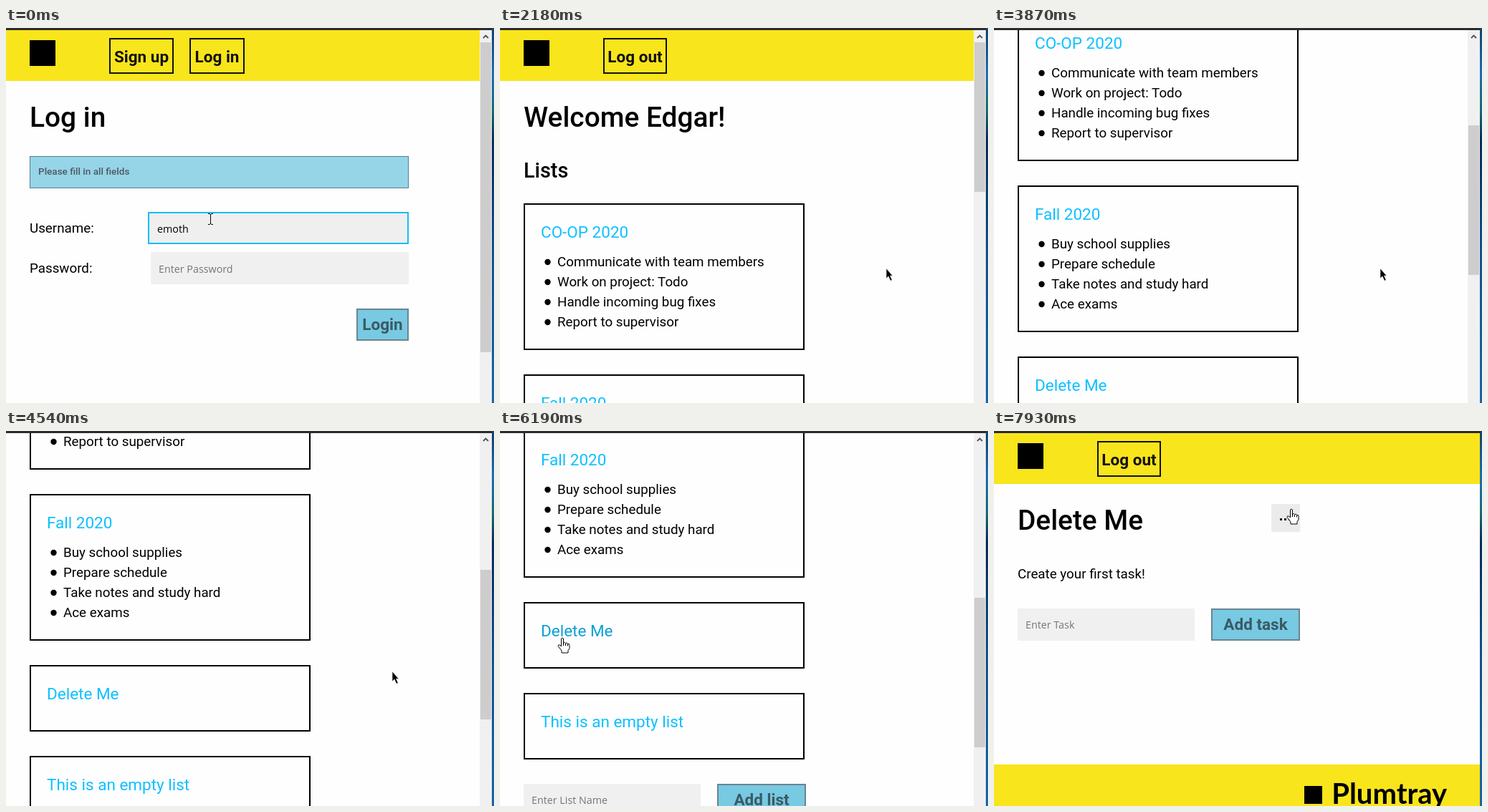
An HTML page that plays this animation: 681x524 px, repeating every 8000 ms.

```html
<!DOCTYPE html>
<html lang="en">
<head>
<meta charset="utf-8">
<title>Todo lists</title>
<style>
html, body { margin: 0; width: 100%; height: 100%; overflow: hidden; background: #fefefe; }
svg { display: block; width: 681px; height: 524px; }
text { font: 400 18.8px Roboto, sans-serif; white-space: pre; }
.h1 { font-size: 38.8px; font-weight: 500; }
.h2 { font-size: 28.8px; font-weight: 500; }
.link { font-size: 22.5px; fill: #0dc0ff; }
.link.over { fill: #0a9fd4; }
.note { font-size: 13.5px; font-weight: 500; fill: #4c5a60; }
.btn { font: 600 22.5px Roboto, sans-serif; font-stretch: 75%; text-anchor: middle; fill: #111; }
.in { font: 400 14.3px "Open Sans", "Noto Sans", sans-serif; }
.hint { fill: #757575; }
.brand { font: 700 40px Lato, sans-serif; text-anchor: end; }
</style>
</head>
<body>
<svg id="stage" viewBox="0 0 681 524"></svg>
<script>
const LOOP = 8000, YELLOW = '#f9e51b', CYAN = '#1cc8ff';

// [ms, x, y, shape]
const pointer = [
  [0, 285, 267, 'beam'], [300, 285, 270, 'beam'], [420, 285, 274, 'beam'],
  [570, 300, 305, 'beam'], [690, 314, 332, 'beam'], [810, 316, 334, 'beam'],
  [1080, 316, 326, 'arrow'], [1230, 430, 399, 'arrow'], [1360, 536, 381, 'arrow'],
  [1510, 540, 347, 'hand'], [1630, 539, 336, 'hand'], [2180, 539, 336, 'arrow'],
  [5790, 405, 318, 'arrow'], [5910, 205, 301, 'arrow'], [6040, 76, 296, 'arrow'],
  [6190, 87, 289, 'hand'], [6840, 87, 289, 'beam'], [7270, 97, 287, 'beam'],
  [7420, 190, 262, 'beam'], [7540, 330, 205, 'arrow'], [7660, 419, 160, 'arrow'],
  [7810, 416, 136, 'hand'], [7930, 415, 109, 'hand']
];

// [ms, scroll offset]
const scroll = [
  [2180, 0], [3050, 44], [3200, 88], [3320, 132], [3470, 220], [3870, 264], [4020, 297],
  [4140, 308], [4540, 396], [4690, 528], [4810, 572], [5400, 528], [5520, 484]
];

const lists = [
  [245, 'CO-OP 2020', ['Communicate with team members', 'Work on project: Todo',
    'Handle incoming bug fixes', 'Report to supervisor']],
  [484, 'Fall 2020', ['Buy school supplies', 'Prepare schedule',
    'Take notes and study hard', 'Ace exams']],
  [723, 'Delete Me', []],
  [850, 'This is an empty list', []]
];

const at = (steps, t) => steps.filter(s => s[0] <= t).pop();

const rect = (x, y, w, h, fill, more = '') =>
  `<rect x="${x}" y="${y}" width="${w}" height="${h}" fill="${fill}" ${more}/>`;
const frame = (x, y, w, h, fill, stroke, line = 2) =>
  rect(x + line / 2, y + line / 2, w - line, h - line, fill, `stroke="${stroke}" stroke-width="${line}"`);
const text = (x, y, str, cls = '') => `<text x="${x}" y="${y}" class="${cls}">${str}</text>`;

const navButton = (x, w, label) =>
  frame(x, 14, w, 50, 'none', '#111') + text(x + w / 2, 47.5, label, 'btn');

function header(width, loggedIn) {
  return rect(0, 0, width, 74, YELLOW) + rect(33, 17, 36, 36, '#000') +
    (loggedIn ? navButton(144, 89, 'Log out')
              : navButton(144, 90, 'Sign up') + navButton(256, 77, 'Log in'));
}

function footer(width, y) {
  return rect(0, y, width, 90, YELLOW) + rect(width - 245, y + 30, 25, 25, '#000') +
    text(width - 46, y + 55, 'Plumtray', 'brand');
}

function button(x, y, w, label, fill) {
  return fill
    ? frame(x, y, w, 45, fill, '#111') + text(x + w / 2, y + 30, label, 'btn')
    : frame(x, y, w, 45, '#78c9e2', '#6b8490') +
      `<g fill-opacity=".6">${text(x + w / 2, y + 30, label, 'btn')}</g>`;
}

// Input of the login form; a focused one grows to the left
function field(y, focused, content) {
  return (focused ? frame(198, y, 364, 45, '#efefef', '#16bdf3') : rect(202, y, 360, 45, '#f0f0f0')) +
    content(focused ? 211 : 213);
}

function adder(y, thing) {
  return rect(33, y, 247, 45, '#f0f0f0') + text(44, y + 28, 'Enter ' + thing[0], 'in hint') +
    button(303, y, 124, thing[1]);
}

function scrollbar(top, height) {
  return rect(661, 0, 17, 524, '#f0f0f0') + rect(662, top, 15, height, '#cdcdcd') +
    '<path d="M666 14l3.5-3.5 3.5 3.5" fill="none" stroke="#505050" stroke-width="1.8"/>';
}

function loginPage(t) {
  const filled = t >= 1080, sent = t >= 1780, y = filled ? 179 : 257;
  const onPass = t >= 690 && !sent;
  const dots = x => [...Array(7).keys()]
    .map(i => `<circle cx="${x + 4 + i * 9.35}" cy="${y + 81}" r="3.7"/>`).join('');
  const caret = (x, top) => rect(x, top, 1, 18, '#000');
  const note = frame(33, 179, 529, 45, '#96d4e8', '#527f90', 1) +
    text(45, 205, 'Please fill in all fields', 'note');
  return header(661) + text(33, 138, 'Log in', 'h1') + (filled ? '' : note) +
    text(33, y + 29, 'Username:') + text(33, y + 85, 'Password:') +
    field(y, t < 690, x => text(x, y + 29, 'emoth', 'in')) +
    field(y + 56, onPass, x => filled
      ? dots(x) + (t < 1230 ? caret(276, y + 70) : '')
      : text(x, y + 85, 'Enter Password', 'in hint') + (onPass ? caret(x, y + 70) : '')) +
    button(489, y + 135, 73, 'Login', filled && (t >= 1510 && !sent ? '#19b6e8' : CYAN)) +
    footer(661, y + 292 + (sent ? 28 : 0)) + scrollbar(20, filled ? 520 : 433);
}

function listCard([y, title, items], over) {
  return frame(33, y, 392, items.length ? 205 : 93, '#fefefe', '#000') +
    text(57, y + 48, title, over ? 'link over' : 'link') +
    items.map((item, i) => `<circle cx="66.5" cy="${y + 82 + i * 28}" r="4.2"/>` +
      text(80, y + 88 + i * 28, item)).join('');
}

function homePage(t) {
  const s = at(scroll, t)[1];
  return `<g transform="translate(0 ${-s})">` + header(661, true) +
    text(33, 138, 'Welcome Edgar!', 'h1') + text(33, 209, 'Lists', 'h2') +
    lists.map((list, i) => listCard(list, i === 2 && t >= 6190)).join('') +
    adder(977, ['List Name', 'Add list']) + footer(661, 1135) + '</g>' +
    scrollbar(Math.round(19.6 + s * 0.441), 209);
}

function listPage(t) {
  return header(678, true) + footer(678, 466) + (t < 6960
    ? text(33, 128, 'Loading list...')
    : text(33, 138, 'Delete Me', 'h1') + rect(387, 102, 40, 39, '#ebebeb', 'rx="2"') +
      [399, 405, 411].map(x => rect(x, 122, 3, 3, '#111')).join('') +
      text(33, 206, 'Create your first task!') + adder(248, ['Task', 'Add task']));
}

const shapes = {
  arrow: '<path d="M0 0V14l3-3 2.8 6.2 2.4-1-2.7-6H9z" stroke="#fff" stroke-width=".6"/>',
  beam: '<path d="M-3-7.5H-1L.5-6.5 2-7.5H4M.5-6.5V6.5M-3 7.5H-1L.5 6.5 2 7.5H4" fill="none" stroke="#000"/>',
  hand: '<path d="M-1.5 1Q0-1 1.5 1V7l2-.5 1 1 2-.3 1 1.2 2 .3.5 2v4l-2 3v3.3H-1V18l-5-6.5q0-2.5 2.5-1.5l2 2z" fill="#fff" stroke="#000"/>' +
    '<path d="M1.5 7v4M4.5 8v3M7.5 8.5v3" stroke="#000"/>'
};

const edge = '<defs><linearGradient id="edge" x2="0" y2="1"><stop stop-color="#17406b"/>' +
  '<stop offset=".12" stop-color="#1a6fb5"/><stop offset=".22" stop-color="#1b6a70"/>' +
  '<stop offset=".3" stop-color="#0a2a58"/><stop offset=".6" stop-color="#12508f"/>' +
  '<stop offset="1" stop-color="#1766a8"/></linearGradient></defs>';

function picture(t) {
  const [, x, y, shape] = at(pointer, t);
  const page = t < 2180 ? loginPage : t < 6840 ? homePage : listPage;
  return edge + rect(0, 0, 681, 524, '#fefefe') + page(t) +
    rect(678, 0, 3, 524, 'url(#edge)') + rect(0, 0, 678, 3, '#2d2b2c') +
    `<g transform="translate(${x} ${y})">${shapes[shape]}</g>`;
}

const stage = document.getElementById('stage');
let shown = '';
function tick() {
  const next = picture(performance.now() % LOOP);
  if (next !== shown) stage.innerHTML = shown = next;
  requestAnimationFrame(tick);
}
tick();
</script>
</body>
</html>
```
